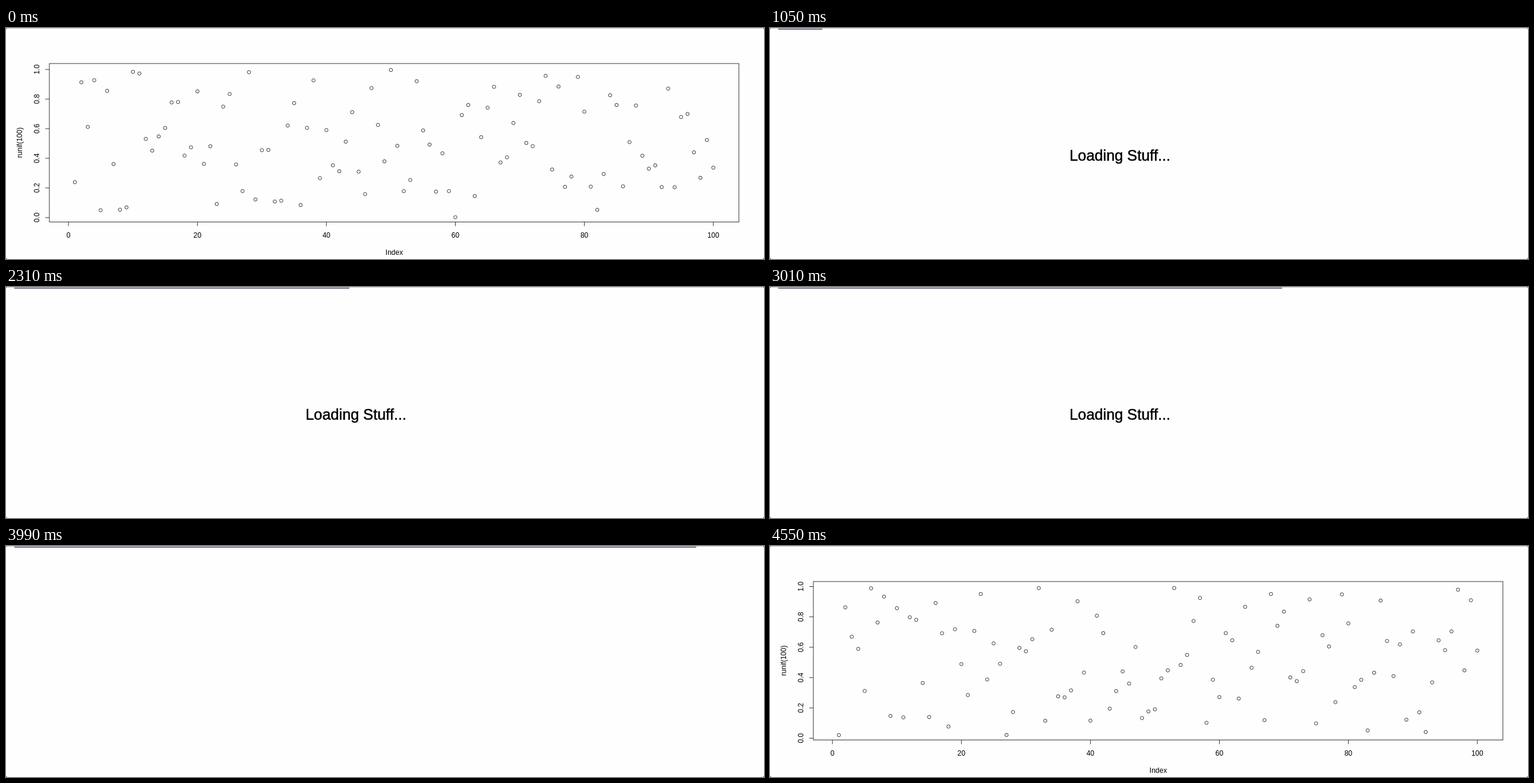
Animation, 1276 px wide and 390 px high, one loop 4.9 s. Source, as an HTML page with a canvas:

```html
<!DOCTYPE html>
<html lang="en">
<head>
<meta charset="utf-8">
<title>Scatter plot loading</title>
<style>
  html, body { margin: 0; width: 100%; height: 100%; overflow: hidden; background: #fefefe; }
  canvas { display: block; }
</style>
</head>
<body>
<canvas id="stage" width="1276" height="390"></canvas>
<script>
const ctx = document.getElementById('stage').getContext('2d');
const LOOP = 4900, STEP = 70;
const FONT = '"Liberation Sans", Arial, sans-serif';

// Seeded uniform random numbers in [0, 1)
function uniform(seed, count) {
  return Array.from({ length: count }, () => {
    seed = (Math.imul(seed, 1664525) + 1013904223) >>> 0;
    return seed / 2 ** 32;
  });
}

// Each plot: pixel heights of 0.0 and 1.0 on the axis, and its samples.
const before = { zero: 320, one: 70, samples: uniform(7, 100) };
const after = { zero: 324.5, one: 68.5, samples: uniform(2024, 100) };

// Right end of the progress bar: [time, x]
const progress = [
  [630, 14], [1050, 88], [2310, 578], [3010, 862],
  [3430, 1017], [3850, 1152], [3990, 1162], [4270, 1264]
];

function barEnd(t) {
  const next = progress.findIndex(([time]) => time > t);
  if (next < 0) return 1264;
  const [t0, x0] = progress[next - 1], [t1, x1] = progress[next];
  return Math.round(x0 + (x1 - x0) * (t - t0) / (t1 - t0));
}

function line(x0, y0, x1, y1) {
  ctx.beginPath();
  ctx.moveTo(x0, y0);
  ctx.lineTo(x1, y1);
  ctx.stroke();
}

function label(text, x, y, angle = 0) {
  ctx.save();
  ctx.translate(x, y);
  ctx.rotate(angle);
  ctx.fillText(text, 0, 0);
  ctx.restore();
}

function drawPlot({ zero, one, samples }) {
  const xAt = i => 105.1 + 10.856 * i;
  const yAt = value => zero + (one - zero) * value;
  ctx.strokeStyle = '#222';
  ctx.fillStyle = '#000';
  ctx.lineWidth = .9;
  ctx.font = `12px ${FONT}`;
  ctx.textAlign = 'center';
  ctx.strokeRect(73, 60, 1160.8, 267.5);

  for (let i = 0; i <= 5; i++) {
    const x = xAt(i * 20), y = yAt(i / 5);
    line(x, 327.5, x, 334.5);
    label(i * 20, x, 354);
    line(66, y, 73, y);
    label((i / 5).toFixed(1), 56, y, -Math.PI / 2);
  }
  label('Index', 653.5, 382.5);
  label('runif(100)', 27, 193.5, -Math.PI / 2);

  samples.forEach((value, i) => {
    ctx.beginPath();
    ctx.arc(xAt(i + 1), yAt(value), 2.8, 0, Math.PI * 2);
    ctx.stroke();
  });
}

function drawMessage() {
  ctx.font = `25.3px ${FONT}`;
  ctx.textAlign = 'left';
  ctx.fillStyle = ctx.strokeStyle = '#000';
  ctx.lineWidth = .5;
  ctx.fillText('Loading Stuff...', 504.3, 224);
  ctx.strokeText('Loading Stuff...', 504.3, 224);
}

function drawWindow() {
  ctx.fillStyle = '#444';
  ctx.fillRect(0, 0, 1276, 390);
  ctx.fillStyle = '#fefefe';
  ctx.beginPath();
  ctx.roundRect(0, 0, 1276, 390, 3);
  ctx.fill();
  ctx.fillStyle = '#c4c4c4';
  ctx.fillRect(2, 0, 1272, 1);
}

function drawBar(t) {
  ctx.globalAlpha = Math.min(1, (4620 - t) / 280);
  ctx.fillStyle = '#757a8e';
  ctx.fillRect(14, 1, barEnd(t) - 14, 2);
  ctx.globalAlpha = 1;
}

function draw(now) {
  const t = Math.floor(now % LOOP / STEP) * STEP;
  drawWindow();
  if (t < 420) drawPlot(before);
  if (t >= 4060) drawPlot(after);
  if (t >= 700 && t < 3850) drawMessage();
  if (t >= 700 && t < 4550) drawBar(t);
  requestAnimationFrame(() => draw(performance.now()));
}
draw(0);
</script>
</body>
</html>
```
